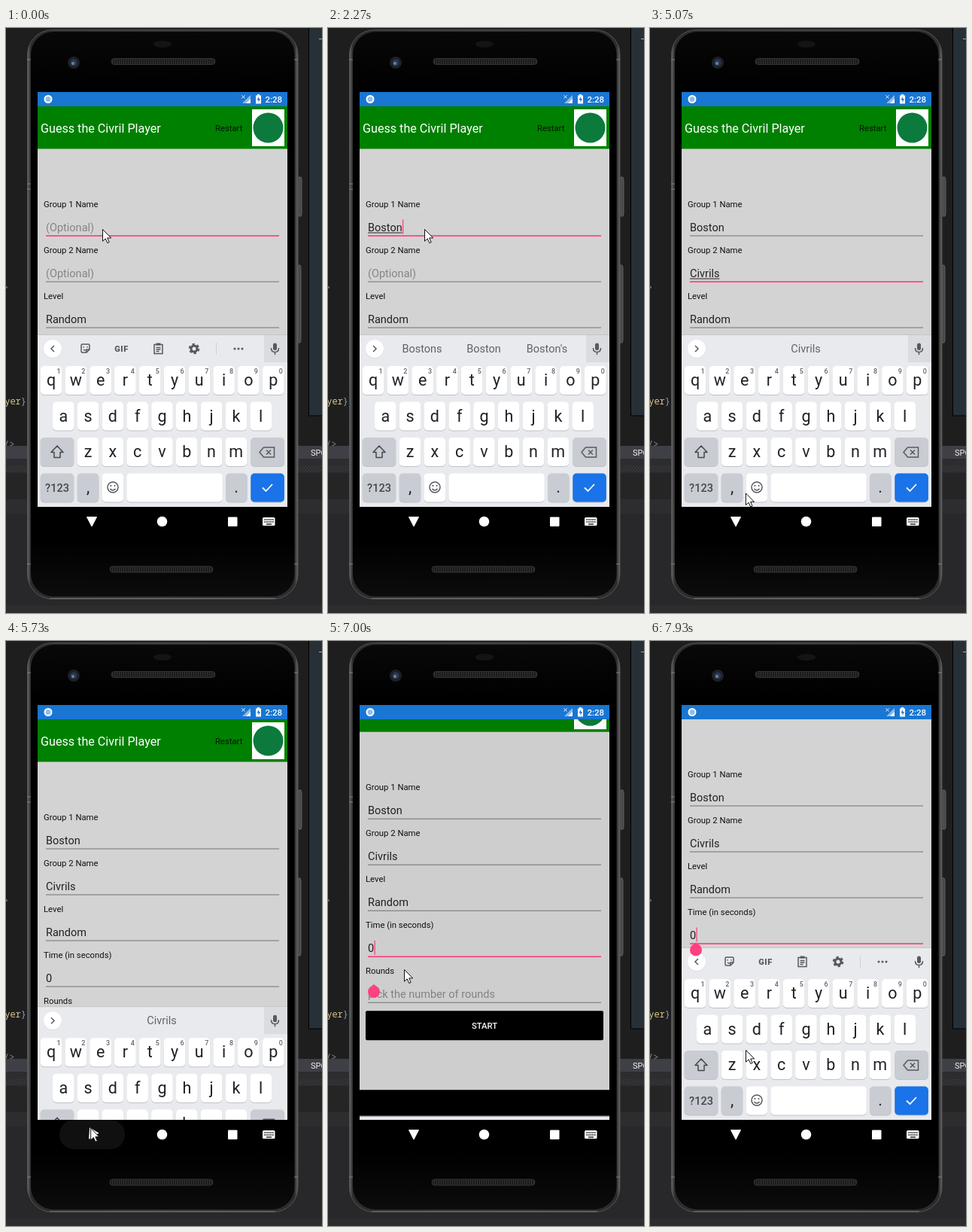
These frames come from a looping animation (420x777 px, 8 s). An HTML page:

```html
<!DOCTYPE html>
<html lang="en">
<head>
<meta charset="utf-8">
<title>Quiz setup on a phone</title>
<style>
html, body { margin: 0; width: 100%; height: 100%; overflow: hidden; background: #1e1e1e; }
svg { display: block; width: 100vw; height: 100vh; }
text { font-family: Roboto, sans-serif; white-space: pre; }
.mono { font: 12px "Noto Sans Mono", monospace; }
.label { font-size: 11.3px; fill: #111; }
.value { font-size: 14.5px; }
.key { font-size: 21.5px; fill: #202124; text-anchor: middle; }
.digit { font-size: 9px; fill: #5f6368; text-anchor: middle; font-weight: 500; }
.word { font-size: 14.5px; fill: #5f6368; text-anchor: middle; }
.line { fill: none; stroke: #565a5f; stroke-width: 1.5; }
</style>
</head>
<body>
<svg viewBox="0 0 420 777" preserveAspectRatio="none">
  <defs>
    <clipPath id="pageClip"><rect x="42" y="104" width="332" height="532"/></clipPath>
    <linearGradient id="rim" x1="0" x2="1" y1="0" y2="0">
      <stop offset="0" stop-color="#686868"/><stop offset=".012" stop-color="#2c2c2c"/>
      <stop offset=".5" stop-color="#333"/><stop offset=".988" stop-color="#2c2c2c"/>
      <stop offset="1" stop-color="#686868"/>
    </linearGradient>
    <linearGradient id="glass" x1="0" x2="0" y1="0" y2="1">
      <stop offset="0" stop-color="#080808"/><stop offset=".1" stop-color="#000"/>
      <stop offset=".9" stop-color="#000"/><stop offset="1" stop-color="#0c0c0c"/>
    </linearGradient>
    <pattern id="dots" width="4" height="4" patternUnits="userSpaceOnUse">
      <rect width="1" height="1" fill="#4a4a4e"/><rect x="2" y="2" width="1" height="1" fill="#4a4a4e"/>
    </pattern>
    <pattern id="grille" width="3" height="8" patternUnits="userSpaceOnUse">
      <rect width="3" height="8" fill="#1c1c1c"/><rect width="1" height="8" fill="#303030"/>
    </pattern>
  </defs>

  <!-- editor behind the phone -->
  <rect width="420" height="777" fill="#1e1e1e"/>
  <rect x="402.5" y="-2" width="30" height="517" fill="#263036" stroke="#000"/>
  <path d="M416 14.500h4" stroke="#aaa"/>
  <text class="mono" x="27" y="500" text-anchor="end" fill="#d7c58a">yer<tspan fill="#8c9cc8">}</tspan></text>
  <text class="mono" x="-4" y="349" fill="#888">&gt;</text>
  <text class="mono" x="-3" y="557" fill="#888">/&gt;</text>
  <rect y="555" width="420" height="222" fill="#2d2d30"/>
  <rect y="555" width="420" height="17" fill="#3f3f46"/>
  <text x="405" y="568" font-size="11" fill="#f1f1f1">SPORT</text>
  <rect y="582" width="420" height="7" fill="url(#dots)"/>
  <rect y="591" width="420" height="35" fill="#252526"/>
  <rect y="645" width="420" height="122" fill="#28282a"/>

  <!-- phone body -->
  <path d="M389 198h3l1 3v46l-1 3h-3zM388 315h3l1 3v97l-1 3h-3z" fill="#484848" stroke="#6a6a6a" stroke-width=".8"/>
  <rect x="28.500" y="2.500" width="359.500" height="756" rx="33" fill="url(#rim)" stroke="#555"/>
  <rect x="33" y="5" width="350.500" height="750" rx="30" fill="url(#glass)"/>
  <path d="M28 42h5M28 207h5M28 214h5M383 42h5M383 712h5M28 712h5" stroke="#808080"/>
  <path d="M58 757.500H358" stroke="#777" stroke-width=".8"/>
  <ellipse cx="208" cy="21.500" rx="12" ry="4.500" fill="#141414"/>
  <circle cx="90" cy="46" r="8" fill="#1d2025"/><circle cx="90" cy="46" r="4.500" fill="#2b3950"/><circle cx="89" cy="47" r="2" fill="#6c83a8"/>
  <rect x="140" y="40.500" width="138" height="8" rx="4" fill="url(#grille)" stroke="#333"/>
  <rect x="138" y="715" width="137" height="8" rx="4" fill="url(#grille)" stroke="#333"/>
  <rect x="42" y="85" width="332" height="590" fill="#000"/>

  <!-- app page -->
  <g clip-path="url(#pageClip)">
    <g id="page">
      <rect x="42" y="104" width="332" height="532" fill="#d3d3d3"/>
      <rect x="42" y="104" width="332" height="56.500" fill="#008000"/>
      <text x="46" y="138.500" font-size="16.150" fill="#fff">Guess the Civril Player</text>
      <text x="278" y="137" font-size="11.300" fill="#031403">Restart</text>
      <rect x="327" y="108" width="43" height="49" fill="#fff"/>
      <circle cx="348.500" cy="132.500" r="20" fill="#0b7a3c"/>
      <g id="fields"></g>
      <rect x="50" y="531" width="316" height="39" rx="2" fill="#000"/>
      <text x="208" y="554.800" font-size="11.300" font-weight="500" fill="#fff" text-anchor="middle">START</text>
      <rect id="compose" height="1" fill="#222"/>
      <rect id="caret" width="1.300" height="19" fill="#ff4081"/>
      <rect id="dim" x="42" y="104" width="332" height="532"/>
    </g>
    <g id="board">
      <rect x="42" y="407" width="332" height="1" fill="#c4c6ca"/>
      <rect x="42" y="408" width="332" height="228" fill="#e8eaed"/>
      <rect id="micBox" x="343" y="408" width="31" height="36" fill="#dadce0"/>
      <circle cx="62" cy="426.500" r="12" fill="#c9ccd0"/><circle cx="62" cy="426" r="12" fill="#fff"/>
      <path id="chevron" class="line"/>
      <g id="tools">
        <path class="line" d="M111 427v-5.500q0-1.500-1.500-1.500h-8q-1.500 0-1.500 1.500v8q0 1.500 1.500 1.500h5.500zM111 427h-4v4M103 423v1.500M108 423v1.500M103 427q1.500 1.500 3 .800"/>
        <text x="153.500" y="430" font-size="11" font-weight="900" fill="#565a5f" text-anchor="middle" letter-spacing=".5">GIF</text>
        <path class="line" d="M197 420.500h11v12h-11zM199.500 424.500h6M199.500 427h6M199.500 429.500h4"/><rect x="199.500" y="418.500" width="6" height="3" fill="#565a5f"/>
        <circle cx="250" cy="426" r="4" fill="none" stroke="#565a5f" stroke-width="3"/>
        <circle cx="250" cy="426" r="6" fill="none" stroke="#565a5f" stroke-width="2.500" stroke-dasharray="3.140"/>
        <path d="M279.500 418v16" stroke="#cfd1d5"/>
        <path d="M304 426h.010M309 426h.010M314 426h.010" stroke="#565a5f" stroke-width="3" stroke-linecap="round"/>
      </g>
      <g id="words"></g>
      <rect x="355" y="418.500" width="5" height="9.500" rx="2.500" fill="#565a5f"/>
      <path class="line" d="M352.500 425q0 5.500 5 5.500t5-5.500M357.500 430.500v3.500"/>
      <g id="keys"></g>
      <path id="shift" d="M68 555l8 8.500h-4v7h-8v-7h-4z" stroke="#44474b" stroke-width="1.500" stroke-linejoin="round"/>
      <path class="line" d="M337 563.500l5.500-6.500h14v13h-14zM346 560.500l6 6M352 560.500l-6 6"/>
      <text x="68" y="616" font-size="14.500" font-weight="500" fill="#44474b" text-anchor="middle">?123</text>
      <text class="key" x="109" y="617">,</text><text class="key" x="306" y="617">.</text>
      <circle class="line" cx="142" cy="610" r="7"/>
      <path class="line" d="M139.500 607v2M144.500 607v2M138.500 612q3.500 4 7 0"/>
      <path d="M341 610.500l4.500 4.500 8.500-9" fill="none" stroke="#fff" stroke-width="1.800"/>
    </g>
  </g>
  <path id="handle" d="M0 0L5.700 4.300A8 8 0 1 1 -5.700 4.300Z" fill="#ff4081"/>

  <!-- status bar -->
  <rect x="42" y="85" width="332" height="19" fill="#1976d2"/>
  <circle cx="56" cy="94.500" r="4.500" fill="#8fbdec" stroke="#fff" stroke-width="2"/>
  <path d="M325 89v11h-11z" fill="#8fb9e8"/><path d="M325 94v6h-6z" fill="#fff"/>
  <path d="M313.500 89.500l4 4m0-4l-4 4" stroke="#fff"/>
  <path d="M332 89.500h2v-1.500h3v1.500h2v11h-7z" fill="#fff"/><path d="M336 91l-2.500 4.500h2v3.500l2.500-5h-2z" fill="#1976d2"/>
  <text x="344.500" y="99" font-size="11.500" font-weight="500" fill="#fff">2:28</text>

  <!-- navigation bar -->
  <rect id="ripple" x="71" y="636" width="87" height="39" rx="19" fill="#181818"/>
  <path id="back" d="M-6.500 0L6 -6.500V6.500Z" fill="#fff" stroke="#fff" stroke-linejoin="round"/>
  <circle cx="207.500" cy="655.500" r="6.800" fill="#fff"/>
  <rect x="295" y="649.500" width="12.500" height="12.500" rx="1" fill="#fff"/>
  <g id="switcher">
    <rect x="341" y="650" width="16.500" height="11" rx="1.500" fill="#fff"/>
    <path d="M343.500 653h12M343.500 656h12" stroke="#000" stroke-width="1.600" stroke-dasharray="1.600 1"/><path d="M346 659h7" stroke="#000" stroke-width="1.300"/>
  </g>
  <path id="mouse" d="M.5 .5V16.200L4.200 12.800L6.800 18.500L9.200 17.500L6.700 11.900H11.700Z" fill="#fff" stroke="#111"/>
</svg>
<script>
const $ = id => document.getElementById(id);
const LOOP = 8000;

function add(parent, tag, attrs, text = "") {
  const node = document.createElementNS("http://www.w3.org/2000/svg", tag);
  for (const k in attrs) node.setAttribute(k, attrs[k]);
  node.textContent = text;
  return parent.appendChild(node);
}
const set = (node, attrs) => { for (const k in attrs) node.setAttribute(k, attrs[k]); };
const show = (node, on) => node.setAttribute("visibility", on ? "visible" : "hidden");
const move = (node, x, y, extra = "") => node.setAttribute("transform", `translate(${x} ${y})${extra}`);

const pen = document.createElement("canvas").getContext("2d");
function widthOf(s) {
  pen.font = "14.5px Roboto, sans-serif";
  return pen.measureText(s).width;
}

// value of the last [time, value] entry reached
const last = (list, t) => list.filter(e => e[0] <= t).pop()[1];
const during = (spans, t) => spans.some(([a, b]) => t >= a && t < b);

// linear track of [time, ...values]
function track(keys, t) {
  const i = keys.findIndex(k => k[0] > t);
  if (i === 0) return keys[0].slice(1);
  if (i < 0) return keys[keys.length - 1].slice(1);
  const a = keys[i - 1], b = keys[i], f = (t - a[0]) / (b[0] - a[0]);
  return a.slice(1).map((v, j) => v + (b[j + 1] - v) * f);
}

const LABELS = ["Group 1 Name", "Group 2 Name", "Level", "Time (in seconds)", "Rounds"];
const HINTS = ["(Optional)", "(Optional)", "", "", "pick the number of rounds"];
const fields = LABELS.map((label, i) => {
  const y = i * 61, g = $("fields");
  add(g, "text", { class: "label", x: 50, y: 238 + y }, label);
  return {
    text: add(g, "text", { class: "value", x: 53, y: 270 + y }),
    line: add(g, "rect", { x: 53, width: 310 })
  };
});

function key(x, y, w, fill) {
  add($("keys"), "rect", { x, y: y + 1, width: w, height: 38, rx: 5, fill: "#bfc2c7" });
  add($("keys"), "rect", { x, y, width: w, height: 38, rx: 5, fill });
}
const letters = [];
[["qwertyuiop", 60, 449], ["asdfghjkl", 76.3, 496.5], ["zxcvbnm", 109, 544]].forEach(([row, x0, y], r) => {
  [...row].forEach((c, i) => {
    const x = x0 + i * 32.8;
    key(x - 14.3, y, 28.6, "#fff");
    letters.push([add($("keys"), "text", { class: "key", x, y: y + 26 }), c]);
    if (!r) add($("keys"), "text", { class: "digit", x: x + 10, y: y + 9.500 }, (i + 1) % 10);
  });
});
const GREY = "#c9ccd2";
key(45.7, 544, 44.6, GREY);
key(325.3, 544, 44.6, GREY);
key(45.7, 591.5, 44.6, GREY);
key(94.7, 591.5, 28.6, GREY);
key(127.5, 591.5, 28.6, "#fff");
key(160.3, 591.5, 127.5, "#fff");
key(292, 591.5, 28.6, GREY);
key(325.3, 591.5, 44.6, "#1a73e8");
const words = [125, 207, 291].map(x => add($("words"), "text", { class: "word", x, y: 431 }));

const TYPED = [
  [[0, ""], [1200, "B"], [1330, "Bo"], [1670, "Bos"], [1730, "Bost"], [1870, "Bosto"], [2000, "Boston"]],
  [[0, ""], [3400, "C"], [3600, "Ci"], [3870, "Civ"], [3930, "Civr"], [4070, "Civril"], [4130, "Civrils"]],
  [[0, "Random"]], [[0, "0"]], [[0, ""]]
];
const COMPOSED = [[0, ""], [2270, "Boston"], [2470, ""], [3670, "Ci"], [3930, "Civr"], [4130, "Civril"], [4330, "Civrils"], [5670, ""]];
const STRIP = [
  [0, ""], [1470, "Bo,Bob,Both"], [1730, "Bos,Boss,Boston"], [2000, "Boston's,Boston,Bottom"],
  [2270, "Bostons,Boston,Boston's"], [2600, ""], [3730, "Ci,City,Cities"], [3930, "Civ,Civil,Civics"],
  [4130, ",Civril,"], [4330, ",Civrils,"], [5930, ""]
];
const FOCUS = [[0, 0], [2470, 1], [5670, -1], [6870, 3]];
const CARET = [[200, 730], [1200, 3000], [3400, 4800], [5330, 5670], [6870, 7270], [7730, LOOP]];
const MOUSE = [
  [4800, 128, 267], [4870, 141, 310], [4930, 159, 420], [5000, 148, 540], [5070, 127, 617],
  [5200, 115, 648], [5470, 112, 654], [5730, 112, 654], [5930, 116, 478], [6600, 116, 478],
  [6730, 101, 436], [7800, 101, 436], [7930, 127, 543]
];
const SCROLL = [[6870, 0], [7000, 39], [7070, 50], [7200, 57]];
const BOARD = [[5670, 0], [5870, 229], [7000, 229], [7130, 90], [7200, 38], [7330, 0]];

function draw(t) {
  const focus = last(FOCUS, t);
  const scroll = track(SCROLL, t)[0];
  const lagged = track(SCROLL, t - 130)[0];
  const drop = track(BOARD, t)[0];

  move($("page"), 0, -scroll);
  fields.forEach(({ text, line }, i) => {
    const value = last(TYPED[i], t), on = i === focus;
    text.textContent = value || HINTS[i];
    set(text, { fill: value ? "#212121" : "#858585" });
    set(line, { y: (on ? 275.2 : 275.5) + i * 61, height: on ? 1.7 : 1, fill: on ? "#ff4081" : "#737373" });
  });

  const composed = last(COMPOSED, t);
  const row = Math.max(focus, 0);
  set($("compose"), { x: 53, y: 271.5 + row * 61, width: widthOf(composed) });
  set($("caret"), { x: 53.3 + widthOf(last(TYPED[row], t)), y: 254.5 + row * 61 });
  show($("caret"), focus >= 0 && during(CARET, t));
  set($("dim"), { opacity: last([[0, 0], [5800, .055], [6670, .025], [7130, 0]], t) });

  const upper = during([[1200, 1270]], t), strip = last(STRIP, t);
  move($("board"), 0, drop);
  show($("board"), drop < 229);
  letters.forEach(([node, c]) => node.textContent = upper ? c.toUpperCase() : c);
  set($("shift"), { fill: upper ? "#44474b" : "none" });
  set($("tools"), { opacity: strip ? 0 : 1 });
  strip.padEnd(1, ",").split(",").concat("", "").slice(0, 3).forEach((w, i) => words[i].textContent = w);
  set($("chevron"), { d: strip ? "M60 422l4 4-4 4" : "M64 422l-4 4 4 4" });
  set($("micBox"), { opacity: t < 5930 ? 1 : 0 });

  show($("handle"), t >= 6870);
  move($("handle"), 61, 457.5 - lagged);

  const [ripple] = track([[5600, 0], [5800, 1], [6600, 1], [6730, 0]], t);
  const [turn] = track([[5670, -90], [5870, 0], [6800, 0], [6930, -90]], t);
  set($("ripple"), { opacity: ripple });
  move($("back"), 114, 655.5, ` rotate(${turn})`);
  show($("switcher"), t < 5800 || t >= 6870);
  const [x, y] = track(MOUSE, t);
  move($("mouse"), x, y);
}

const start = performance.now();
function tick(now) {
  const t = Math.max(0, now - start) % LOOP;
  draw(Math.floor(t * .015 + .1) / .015 + 5);
  requestAnimationFrame(tick);
}
draw(0);
requestAnimationFrame(tick);
</script>
</body>
</html>
```
